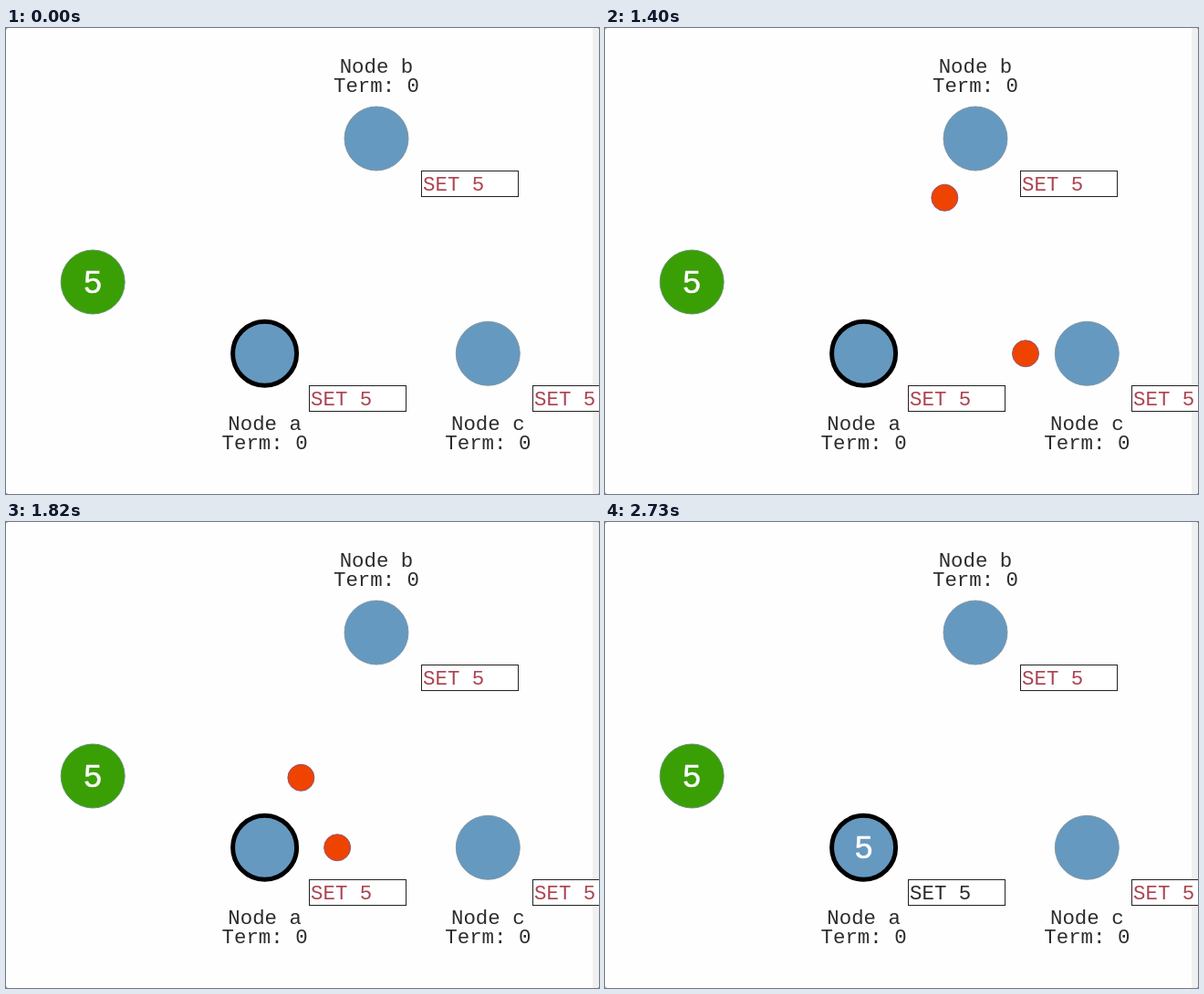
An HTML page for the animation above (2940 ms loop, 650x510 px).

```html
<!DOCTYPE html>
<html lang="en">
<head>
<meta charset="utf-8">
<style>
html, body { margin: 0; width: 100%; height: 100%; overflow: hidden; background: #999; }
svg { display: block; width: 650px; height: 510px; background: #fefefe; border-radius: 3px; }
text { font: 22.4px "Liberation Mono", monospace; fill: #2c2c2c; }
.label { text-anchor: middle; }
.value { font: 35.5px "Liberation Sans", sans-serif; fill: #fff; stroke: #fff; stroke-width: .5; text-anchor: middle; }
.box { fill: #fff; stroke: #222; stroke-width: 1; }
.pending { fill: #ac4452; }
.node { fill: #6699c0; stroke: #7b919f; stroke-width: .9; }
.leader { stroke: #000; stroke-width: 5; }
.client { fill: #3a9f04; stroke: #5f8f6c; stroke-width: .9; }
.message { fill: #ee4400; stroke: #8f5578; stroke-width: 1; }
</style>
</head>
<body>
<svg id="stage" viewBox="0 0 650 510">
  <rect x="643" width="7" height="510" fill="#f0f0f0"/>
</svg>
<script>
const LOOP = 2940, STEP = 70, COMMIT = 2240;
const stage = document.getElementById("stage");

function add(tag, attrs, content = "") {
  const el = document.createElementNS("http://www.w3.org/2000/svg", tag);
  for (const key in attrs) el.setAttribute(key, attrs[key]);
  el.textContent = content;
  return stage.appendChild(el);
}

const nodes = {
  a: { x: 283.6, y: 356.3, labelY: 440 },
  b: { x: 406, y: 121, labelY: 49 },
  c: { x: 528.3, y: 356.3, labelY: 440 }
};

// Messages lie under the nodes, so they emerge from and vanish behind them.
const messages = ["b", "c"].map(name => ({
  from: nodes[name],
  el: add("circle", { r: 14.5, class: "message" })
}));

for (const [name, n] of Object.entries(nodes)) {
  add("circle", { cx: n.x, cy: n.y, r: 35, class: name === "a" ? "node leader" : "node" });
  add("text", { x: n.x, y: n.labelY, class: "label" }, "Node " + name);
  add("text", { x: n.x, y: n.labelY + 21, class: "label" }, "Term: 0");
  const left = Math.floor(n.x + 49) + .5, top = Math.round(n.y + 35) + .5;
  add("rect", { x: left, y: top, width: 106, height: 28, class: "box" });
  n.entry = add("text", { x: left + 1.6, y: top + 21.5, class: "pending" }, "SET 5");
}

add("circle", { cx: 95.2, cy: 278, r: 35, class: "client" });
add("text", { x: 95, y: 290, class: "value" }, "5");
const leaderValue = add("text", { x: nodes.a.x, y: 368, class: "value" }, "5");

// Travel of the replies: [time, fraction of the way]
const travel = [[1143, 0], [1400, .275], [1540, .4234], [1820, .675], [2181, 1]];

function progress(t) {
  if (t <= travel[0][0]) return 0;
  for (let i = 1; i < travel.length; i++) {
    const [t0, p0] = travel[i - 1], [t1, p1] = travel[i];
    if (t < t1) return p0 + (p1 - p0) * (t - t0) / (t1 - t0);
  }
  return 1;
}

function draw(t) {
  const p = progress(t), to = nodes.a;
  for (const { from, el } of messages) {
    el.setAttribute("cx", from.x + (to.x - from.x) * p);
    el.setAttribute("cy", from.y + (to.y - from.y) * p);
  }
  const committed = t >= COMMIT;
  leaderValue.style.visibility = committed ? "visible" : "hidden";
  nodes.a.entry.classList.toggle("pending", !committed);
}

const start = performance.now();
function tick() {
  const t = (performance.now() - start) % LOOP;
  draw(Math.min(Math.floor(t / STEP) * STEP, 2730));
  requestAnimationFrame(tick);
}
tick();
</script>
</body>
</html>
```
